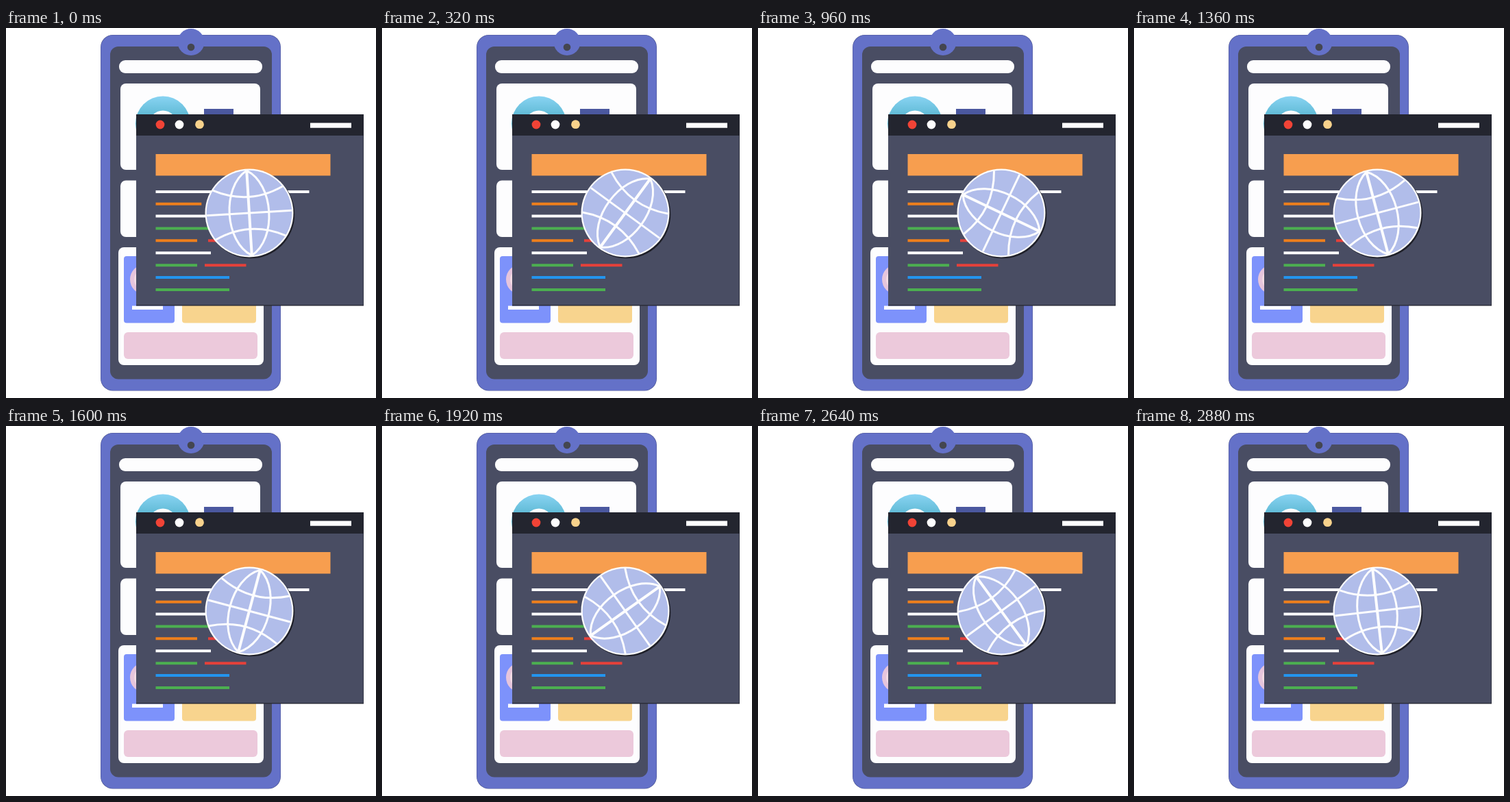
These frames come from a looping animation (540 by 540 pixels, 2960 ms). An HTML page with a canvas:

```html
<!DOCTYPE html>
<html lang="en">
<head>
<meta charset="utf-8">
<title>Spinning globe</title>
<style>
  html, body { margin: 0; width: 100%; height: 100%; overflow: hidden; background: #fff; }
  canvas { display: block; width: 540px; height: 540px; }
</style>
</head>
<body>
<canvas id="stage"></canvas>
<script>
const LOOP = 2960;
const STEP = 80;
const START_ANGLE = -3.5;
const STEP_ANGLE = 9.92;

const WHITE = '#fdfdfe', SLATE = '#494d63', INDIGO = '#6471c8';
const ORANGE = '#ee7f1c', GREEN = '#4caf50', RED = '#e5413a', BLUE = '#2394ee';

const canvas = document.getElementById('stage');
const ctx = canvas.getContext('2d');
const ratio = window.devicePixelRatio || 1;
canvas.width = canvas.height = 540 * ratio;
ctx.scale(ratio, ratio);

// Boxes are given by their left, top, right and bottom edges.
function box(x1, y1, x2, y2, color, radius = 0) {
  ctx.fillStyle = color;
  ctx.beginPath();
  ctx.roundRect(x1, y1, x2 - x1, y2 - y1, radius);
  ctx.fill();
}

function disc(x, y, r, color) {
  ctx.fillStyle = color;
  ctx.beginPath();
  ctx.arc(x, y, r, 0, Math.PI * 2);
  ctx.fill();
}

function drawPhone() {
  box(138, 10, 401, 529.5, '#4c5593', 18);
  box(138.5, 10.5, 400.5, 529, INDIGO, 18);
  box(152, 27, 388, 512.5, SLATE, 12);
  disc(270, 20.5, 19.5, INDIGO);
  disc(270, 28, 5.3, '#444650');

  box(165, 47, 374, 66, WHITE, 9);
  box(167, 81, 371, 207, WHITE, 8);
  box(167, 222.5, 371, 305, WHITE, 8);
  box(164, 320, 376, 492, WHITE, 8);

  const sky = ctx.createLinearGradient(0, 99, 0, 130);
  sky.addColorStop(0, '#8ad4f3');
  sky.addColorStop(1, '#5cb8d3');
  disc(229, 139.5, 40, sky);
  disc(229, 141, 20.5, WHITE);
  box(289, 118, 332, 140, '#4b589f');

  box(172, 333, 246, 430.5, '#7d92fb', 4);
  disc(203, 367, 22, '#e6c5dc');
  disc(203, 367, 16, '#f3dce4');
  box(184, 405.5, 229, 411, WHITE);
  box(257, 390, 365, 430.5, '#f8d48e', 4);
  box(172, 444, 367, 483, '#ecc9db', 6);
}

function drawWindow() {
  box(190, 126, 522, 405.5, '#2b2d39');
  box(190, 126, 521.3, 404, SLATE);
  box(190, 126, 522, 157, '#23252f');
  disc(225, 141, 6.4, '#f14336');
  disc(253, 141, 6.4, WHITE);
  disc(282.5, 140.7, 6.4, '#f8d28c');
  box(444, 138.5, 504, 145.7, WHITE);
  box(218.5, 184, 473.5, 215.5, '#f79e4f');

  const lines = [
    [239, 218.5, 442.5, WHITE],
    [256.7, 218.5, 285.3, ORANGE],
    [274.5, 218.5, 310, WHITE],
    [292.4, 218.5, 310, GREEN],
    [310.3, 218.5, 279, ORANGE],
    [310.3, 295, 325, RED],
    [328.2, 218.5, 299, WHITE],
    [346.2, 218.5, 279, GREEN],
    [346.2, 290, 350.5, RED],
    [364.1, 218.5, 326, BLUE],
    [382, 218.5, 326, GREEN]
  ];
  for (const [y, x1, x2, color] of lines) box(x1, y - 2, x2, y + 2, color);
}

function drawGlobe(angle) {
  disc(357, 272, 64.3, '#1f2029');
  disc(355, 270, 64.5, WHITE);
  disc(355, 270, 62.3, '#b1bdea');

  ctx.save();
  ctx.translate(355, 270);
  ctx.rotate(angle * Math.PI / 180);
  ctx.strokeStyle = WHITE;

  ctx.lineWidth = 3;
  ctx.beginPath();
  ctx.moveTo(-62, 0);
  ctx.lineTo(62, 0);
  for (const side of [-1, 1]) {
    ctx.moveTo(0, -62);
    ctx.bezierCurveTo(side * 38.5, -40, side * 38.5, 40, 0, 62);
    ctx.moveTo(-51, side * 36);
    ctx.quadraticCurveTo(0, side * 11, 51, side * 36);
  }
  ctx.stroke();

  ctx.lineWidth = 4;
  ctx.beginPath();
  ctx.moveTo(0, -62);
  ctx.lineTo(0, 62);
  ctx.stroke();
  ctx.restore();
}

const begin = performance.now();

function draw(now) {
  const time = Math.max(0, now - begin) % LOOP;
  ctx.fillStyle = '#fff';
  ctx.fillRect(0, 0, 540, 540);
  drawPhone();
  drawWindow();
  drawGlobe(START_ANGLE + STEP_ANGLE * Math.floor(time / STEP));
  requestAnimationFrame(draw);
}

draw(begin);
</script>
</body>
</html>
```
